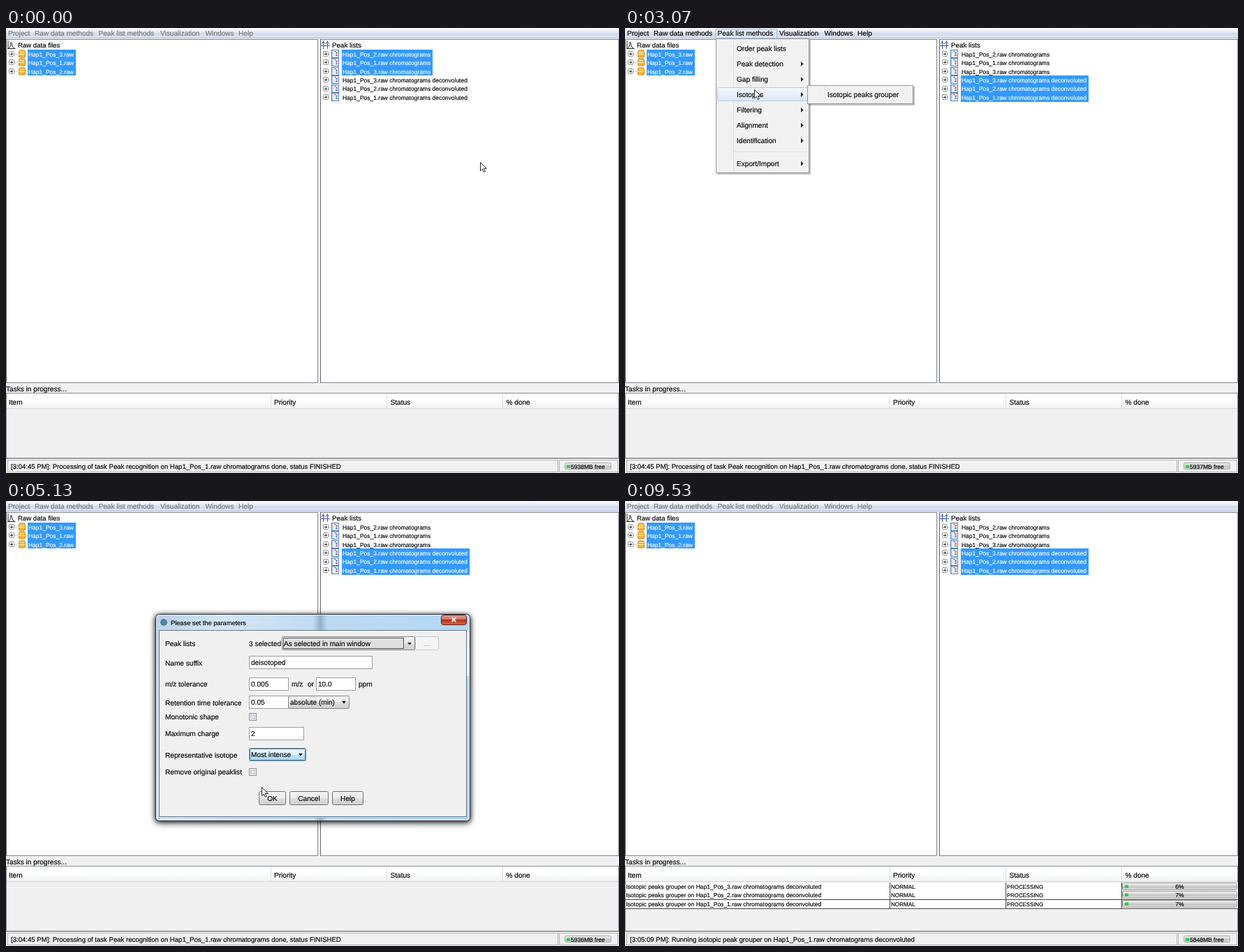
These frames come from a looping animation (878 by 638 pixels, 9.59 s). An HTML page:

```html
<!DOCTYPE html>
<html lang="en">
<head>
<meta charset="utf-8">
<title>Isotopic peaks grouper</title>
<style>
  html, body { margin: 0; width: 100%; height: 100%; overflow: hidden; background: #f0f0f0; }
  svg { position: absolute; left: 0; top: 0; width: 878px; height: 638px; }
  text { font-family: "Liberation Sans", Arial, sans-serif; white-space: pre; text-rendering: geometricPrecision; stroke-width: .15px; }
  rect { shape-rendering: crispEdges; }
  .soft { shape-rendering: auto; }
  #dialog { transform-origin: 439.5px 310.5px; }
  #frame { filter: drop-shadow(0 1px 3px rgba(0, 0, 0, .7)) drop-shadow(0 2px 4px rgba(0, 0, 0, .55)); }
</style>
</head>
<body>
<svg viewBox="0 0 878 638">
  <defs>
    <linearGradient id="bar" x2="0" y2="1">
      <stop offset="0" stop-color="#fdfdff"/><stop offset=".4" stop-color="#e6eaf5"/>
      <stop offset=".5" stop-color="#d4dbed"/><stop offset="1" stop-color="#dce2f2"/>
    </linearGradient>
    <linearGradient id="head" x2="0" y2="1">
      <stop offset=".4" stop-color="#fff"/><stop offset="1" stop-color="#f1f2f4"/>
    </linearGradient>
    <linearGradient id="track" x2="0" y2="1">
      <stop offset="0" stop-color="#f2f2f2"/><stop offset=".45" stop-color="#d6d6d6"/>
      <stop offset=".55" stop-color="#c2c2c2"/><stop offset="1" stop-color="#dedede"/>
    </linearGradient>
    <linearGradient id="green" x2="0" y2="1">
      <stop offset="0" stop-color="#8fe89a"/><stop offset=".5" stop-color="#1fc43a"/>
      <stop offset="1" stop-color="#3fd957"/>
    </linearGradient>
    <linearGradient id="button" x2="0" y2="1">
      <stop offset="0" stop-color="#f3f3f3"/><stop offset=".5" stop-color="#ebebeb"/>
      <stop offset=".52" stop-color="#dddddd"/><stop offset="1" stop-color="#cfcfcf"/>
    </linearGradient>
    <linearGradient id="hot" x2="0" y2="1">
      <stop offset="0" stop-color="#eaf6fd"/><stop offset=".5" stop-color="#d9f0fc"/>
      <stop offset=".52" stop-color="#bee6fd"/><stop offset="1" stop-color="#a7d9f5"/>
    </linearGradient>
    <linearGradient id="pick" x2="0" y2="1">
      <stop offset="0" stop-color="#f3f7fc"/><stop offset="1" stop-color="#dbe8f8"/>
    </linearGradient>
    <linearGradient id="glass" x2="1" y2=".25">
      <stop offset="0" stop-color="#b9d1e9"/><stop offset=".2" stop-color="#d5e6f5"/>
      <stop offset=".5" stop-color="#bfdaf1"/><stop offset="1" stop-color="#b0d7f5"/>
    </linearGradient>
    <linearGradient id="close" x2="0" y2="1">
      <stop offset="0" stop-color="#e0a598"/><stop offset=".45" stop-color="#cf6f5c"/>
      <stop offset=".5" stop-color="#b5301b"/><stop offset="1" stop-color="#d4694b"/>
    </linearGradient>
    <linearGradient id="smudge">
      <stop offset="0" stop-color="#54708f" stop-opacity="0"/><stop offset=".5" stop-color="#54708f" stop-opacity=".4"/>
      <stop offset="1" stop-color="#54708f" stop-opacity="0"/>
    </linearGradient>
  </defs>
  <g id="base"></g>
  <g id="live"></g>
</svg>
<svg id="dialog" viewBox="0 0 878 638"></svg>
<svg viewBox="0 0 878 638">
  <path id="cursor" d="M.5 .5V12.8L3.4 10.2L5.3 14.5L7.3 13.6L5.4 9.4H9.3Z" fill="#fff" stroke="#111" stroke-width=".9"/>
</svg>
<script>
const LOOP = 9590, STEP = 200 / 3;
const $ = id => document.getElementById(id);
const rect = (x, y, w, h, fill, extra = '') =>
  `<rect x="${x}" y="${y}" width="${w}" height="${h}" fill="${fill}" ${extra}/>`;
const box = (x, y, w, h, fill, stroke, rx = 0) =>
  rect(x + .5, y + .5, w - 1, h - 1, fill, `stroke="${stroke}" rx="${rx}" class="soft"`);
const text = (x, y, str, size = 10.1, fill = '#000', anchor = 'start') =>
  `<text x="${x}" y="${y}" font-size="${size}" fill="${fill}" stroke="${fill}" text-anchor="${anchor}">${str}</text>`;
const path = (d, stroke, fill = 'none', extra = '') =>
  `<path d="${d}" stroke="${stroke}" fill="${fill}" ${extra}/>`;
const rowTop = i => 31 + i * 12.45;

function treeNode(x, i) {
  const y = Math.round(rowTop(i)) + 2;
  return box(x, y, 8, 8, '#fff', '#919191', 1) + rect(x + 2, y + 3.5, 4, 1, '#333') +
    rect(x + 3.5, y + 2, 1, 4, '#333') + path(`M${x + 8} ${y + 4.5}h6`, '#aaa', 'none', 'stroke-dasharray="1 1"');
}

function folder(i) {
  const y = Math.round(rowTop(i));
  return path(`M18.5 ${y + 4}l1-3h7l1 3v6q0 1-1 1h-7q-1 0-1-1z`, '#c8861a', '#f7b733') +
    path(`M19.5 ${y + 3.5}h7M18 ${y + 6.5}h9`, '#fff3c4');
}

function listIcon(i) {
  const y = Math.round(rowTop(i));
  return box(466, y, 11, 12, '#f8fbff', '#4a80c4') + rect(467, y + 1, 2, 10, '#c3daf3') + rect(470, y + 2, 3, 1, '#c33') +
    rect(472, y + 4, 3, 1, '#447') + rect(472, y + 6, 3, 1, '#b55') + rect(472, y + 8, 3, 1, '#447');
}

function base() {
  let s = rect(0, 0, 878, 638, '#f0f0f0') + rect(0, 0, 878, 15, 'url(#bar)') + rect(0, 14, 878, 1, '#b9c0d2');
  for (const [x, w] of [[0, 447], [450, 428]])
    s += box(x, 16, w, 493, '#fff', '#828790') + rect(x, 16, 1, 493, '#62666c');
  s += path('M2 29.5H13.5M3 18V30M4 28.5Q6.5 28 7.2 20Q8 20 8.7 25Q9.5 28.5 12 28.5', '#222');
  s += path('M451 25.5H464M454.5 18V30M460.5 18V30M452 22.5l2.5-3 2.5 3M458 22.5l2.5-3 2.5 3', '#3558b8');
  s += text(17, 28, 'Raw data files', 9.6) + text(467, 28, 'Peak lists', 9.8);
  s += rect(31, 31, 69, 37, '#3399ff');
  [3, 1, 2].forEach((n, i) => {
    s += treeNode(4, i) + folder(i) + text(32, rowTop(i) + 9.6, `Hap1_Pos_${n}.raw`, 8.47, '#fff');
  });
  for (let i = 0; i < 6; i++) s += treeNode(454, i) + listIcon(i);
  s += text(0, 520.5, 'Tasks in progress...');
  s += box(0, 523, 878, 94, '#f0f0f0', '#8a8e94') + rect(1, 524, 876, 21, 'url(#head)') + rect(1, 545, 876, 1, '#d5d5d5');
  [['Item', 4], ['Priority', 384], ['Status', 550.5], ['% done', 716.5]].forEach(([label, x]) => {
    s += text(x, 540, label);
    if (x > 4) s += rect(Math.floor(x) - 5, 524, 1, 21, '#dcdee2');
  });
  s += rect(0, 617, 878, 1, '#a8a8a8') + rect(0, 618, 878, 1, '#fff');
  for (const [x, w] of [[2, 789], [792, 85]]) s += box(x, 619, w, 18, '#f0f0f0', '#b4b4b4');
  return s;
}

const MENUS = [['Project', 3], ['Raw data methods', 41], ['Peak list methods', 132.5], ['Visualization', 221], ['Windows', 285.5], ['Help', 333]];
const POPUP = ['Order peak lists', 'Peak detection', 'Gap filling', 'Isotopes', 'Filtering', 'Alignment', 'Identification', 'Export/Import'];
const LISTS = ['2', '1', '3', '3', '2', '1'];

function menuBar(t) {
  const active = (t >= 660 && t < 3860) || (t >= 5790 && t < 9520);
  let s = t >= 2260 && t < 3860 ? box(129, 1, 89, 14, '#dde8f7', '#a3b9da', 2) : '';
  MENUS.forEach(([label, x]) => s += text(x, 11, label, 10.1, active ? '#000' : '#777'));
  return s;
}

function peakLists(t) {
  const first = t < 660 ? 0 : 3, last = t < 660 ? 2 : t < 1460 ? 3 : 5;
  const width = first ? 183 : 130, top = Math.round(rowTop(first));
  let s = rect(481, top, width, Math.round(rowTop(last + 1)) - top, '#3399ff');
  LISTS.forEach((n, i) => {
    const label = `Hap1_Pos_${n}.raw chromatograms` + (i > 2 ? ' deconvoluted' : '');
    s += text(482, rowTop(i) + 9.6, label, 8.47, i >= first && i <= last ? '#fff' : '#000');
  });
  const focused = (t >= 660 && t < 2320) || (t >= 5860 && t < 9520);
  if (focused) s += box(481, Math.round(rowTop(last)), width, 12, 'none', '#1c4f86');
  return s;
}

function popups(t, [x, y]) {
  if (t < 2320 || t >= 3860) return '';
  const panel = (px, py, w, h) => rect(px + 2, py + 2, w, h, '#000', 'opacity=".25"') +
    box(px, py, w, h, '#f1f1f1', '#979797') + rect(px + 25, py + 2, 1, h - 4, '#e0e0e0');
  const rowY = i => 18 + i * 22 + (i > 6 ? 11 : 0);
  const hover = x > 262 ? 3 : Math.floor((y - 18) / 22);
  let s = panel(130, 15, 134, 193);
  POPUP.forEach((label, i) => {
    const r = rowY(i);
    if (i === hover) s += box(132, r + 1, 130, 20, 'url(#pick)', '#aeccf0', 2);
    s += text(160, r + 14.5, label);
    if (i) s += path(`M252 ${r + 8}l3.5 3.5-3.5 3.5z`, 'none', '#222');
  });
  s += rect(156, 177, 106, 1, '#dcdcdc');
  if (t >= 3060) {
    s += panel(261, 82, 152, 27);
    if (x > 262) s += box(263, 86, 148, 19, 'url(#pick)', '#aeccf0', 2);
    s += text(290, 99, 'Isotopic peaks grouper');
  }
  if (t >= 3720) s += box(303, 106, 306, 17, '#fff', '#767676', 2) +
    text(308, 118, 'This module detects isotopic peaks and leaves one representative', 9.9, '#555');
  return s;
}

// [start time, percent of each task]
const PROGRESS = [[5790, 0, 0, 0], [6930, 1, 1, 1], [7190, 2, 2, 2], [7590, 3, 3, 2], [7860, 3, 3, 3], [8260, 4, 4, 4],
  [8860, 5, 5, 5], [9120, 5, 6, 6], [9460, 6, 7, 7]];
// [start time, free megabytes]
const MEMORY = [[0, 5938], [2860, 5937], [4660, 5936], [6590, 4780], [7590, 3235], [8660, 5848]];
const latest = (list, t) => list.filter(e => t >= e[0]).pop();

function tasks(t) {
  const state = latest(PROGRESS, t);
  if (!state) return '';
  let s = '';
  [3, 2, 1].forEach((n, i) => {
    const y = Math.round(546.5 + i * 12.5), percent = state[i + 1];
    s += rect(1, y, 877, 13, '#fff') + rect(0, y + 12, 878, 1, '#444');
    for (const x of [379, 545, 711]) s += rect(x, y, 1, 13, '#444');
    s += text(1.5, y + 9, `Isotopic peaks grouper on Hap1_Pos_${n}.raw chromatograms deconvoluted`, 8.5);
    s += text(381, y + 9, 'NORMAL', 8.1) + text(547, y + 9, 'PROCESSING', 7.8);
    s += box(712, y, 165, 11, 'url(#track)', '#999', 2);
    if (percent > 4) s += rect(716, y + 3, 5, 5, 'url(#green)');
    s += text(794.5, y + 9, percent + '%', 8.5, '#000', 'middle');
  });
  return s;
}

function statusBar(t) {
  const free = latest(MEMORY, t)[1];
  const message = t < 5790
    ? '[3:04:45 PM]: Processing of task Peak recognition on Hap1_Pos_1.raw chromatograms done, status FINISHED'
    : '[3:05:09 PM]: Running isotopic peak grouper on Hap1_Pos_1.raw chromatograms deconvoluted';
  return text(7, 632, message, 9.58) + box(800, 623, 67, 10, 'url(#track)', '#aaa', 2) +
    rect(803, 626, Math.max(5, (6000 - free) / 6000 * 65), 5, 'url(#green)') +
    text(809, 632, free + 'MB free', 8.5);
}

const field = (x, y, w, value) => box(x, y, w, 19, '#fff', '#9a9da2') + text(x + 3, y + 13, value);
const arrow = (x, y) => path(`M${x} ${y}h6l-3 3.5z`, 'none', '#111');
const combo = (x, y, w, value) => box(x, y, w, 19, 'url(#button)', '#858585', 1) +
  text(x + 3, y + 13, value) + arrow(x + w - 11, y + 8);
const check = (x, y) => box(x, y, 11, 11, '#f4f4f4', '#8e8f8f') + box(x + 2, y + 2, 7, 7, '#dfe2e6', '#c4c8cd');
const button = (x, w, label) => box(x, 416, w, 20, 'url(#button)', '#707070', 2) +
  text(x + w / 2, 430, label, 10.1, '#000', 'middle');

function dialog() {
  const labels = [['Peak lists', 207.5], ['Name suffix', 235.5], ['m/z tolerance', 266], ['Retention time tolerance', 292.5],
    ['Monotonic shape', 313], ['Maximum charge', 337], ['Representative isotope', 367.5], ['Remove original peaklist', 391.5]];
  let s = `<g id="frame">${box(214, 162, 451, 297, 'url(#glass)', '#26333f', 5)}</g>` +
    box(215, 163, 449, 295, 'none', '#e6f3fd', 4) + rect(440, 164, 20, 21, 'url(#smudge)') +
    rect(440, 454, 20, 4, 'url(#smudge)') + rect(660, 185, 4, 66, '#e9f3fc') +
    box(219, 185, 441, 268, '#f0f0f0', '#66788a');
  s += '<circle cx="226" cy="174" r="5" fill="#5382a1"/>' + text(236, 177.5, 'Please set the parameters', 9.25);
  s += box(623, 163, 37, 15, 'url(#close)', '#5a2018', 3) +
    path('M638.5 167.5l6 5.5M644.5 167.5l-6 5.5', '#fff', 'none', 'stroke-width="1.8"');
  for (const [label, y] of labels) s += text(228, y, label);
  s += text(348, 207.5, '3 selected') + box(395, 194, 191, 20, 'url(#button)', '#858585', 1) +
    box(397, 196, 173, 16, '#dedede', '#555') + text(398, 207.5, 'As selected in main window') + arrow(575, 203);
  s += box(586, 194, 34, 20, '#f4f4f4', '#c4c7ca', 2) + text(603, 208, '...', 10.1, '#999', 'middle');
  s += field(348, 222, 177, 'deisotoped') + field(348, 253, 57, '0.005') + text(409, 266, 'm/z') + text(432, 266, 'or') +
    field(444, 253, 57, '10.0') + text(505, 266, 'ppm');
  s += field(348, 279, 57, '0.05') + combo(404, 279, 88, 'absolute (min)') + check(348, 304) + field(348, 324, 79, '2') +
    combo(348, 354, 82, 'Most intense') + check(348, 383);
  s += `<g id="comboHot">${box(349, 355, 80, 17, 'url(#hot)', '#3c7fb1', 1)}${text(351, 367, 'Most intense')}${arrow(419, 362)}</g>`;
  s += button(362, 39, 'OK') + button(406, 56, 'Cancel') + button(467, 45, 'Help');
  s += `<g id="okHot">${box(362, 416, 39, 20, 'url(#hot)', '#3c7fb1', 2)}${text(381.5, 430, 'OK', 10.1, '#000', 'middle')}</g>`;
  return s;
}

const clamp = v => Math.min(1, Math.max(0, v));

function poseDialog(t) {
  const d = $('dialog'), k = clamp((t - 3867) / 260), rest = (1 - k) ** 1.5;
  d.style.display = t >= 3860 && t < 5790 ? '' : 'none';
  d.style.opacity = t >= 5725 ? .3 : .2 + .8 * k ** .8;
  d.style.transform = rest
    ? `perspective(580px) translateY(${-4 * rest}px) scale(${1 - .082 * rest}) rotateX(${-6.6 * rest}deg)` : 'none';
  $('comboHot').style.opacity = t < 4990 ? 0 : clamp((5530 - t) / 330);
  $('okHot').style.opacity = t >= 5190 ? 1 : 0;
}

// [time, x, y]
const ROUTE = [[0, 679, 192], [130, 668, 165], [270, 640, 90], [400, 633, 75], [800, 633, 75], [1000, 638, 88], [1200, 630, 103],
  [1600, 630, 103], [1733, 500, 88], [1933, 234, 42], [2133, 185, 16], [2267, 176, 9], [2533, 176, 9], [2867, 182, 86],
  [3133, 186, 88], [3267, 186, 88], [3533, 268, 90], [3733, 303, 92], [4200, 303, 92], [4533, 330, 215], [4867, 355, 340],
  [5200, 369, 427], [6133, 369, 427], [6267, 369, 435], [6400, 369, 435], [6733, 369, 560], [6867, 369, 560], [7267, 360, 613]];

function cursorAt(t) {
  const i = ROUTE.findIndex(p => p[0] > t);
  if (i < 0) return ROUTE[ROUTE.length - 1].slice(1);
  const [t0, x0, y0] = ROUTE[i - 1], [t1, x1, y1] = ROUTE[i], k = (t - t0) / (t1 - t0);
  return [Math.round(x0 + (x1 - x0) * k), Math.round(y0 + (y1 - y0) * k)];
}

let shown = -1;
function draw(now) {
  const step = Math.floor((now % LOOP + 4) / STEP);
  if (step === shown) return;
  shown = step;
  const t = step * STEP, point = cursorAt(t);
  $('live').innerHTML = menuBar(t) + peakLists(t) + tasks(t) + statusBar(t) + popups(t, point);
  poseDialog(t);
  $('cursor').setAttribute('transform', `translate(${point})`);
  $('cursor').style.display = t < 7325 ? '' : 'none';
}

$('base').innerHTML = base();
$('dialog').innerHTML = dialog();
const start = performance.now();
(function tick() {
  draw(performance.now() - start);
  requestAnimationFrame(tick);
})();
</script>
</body>
</html>
```
